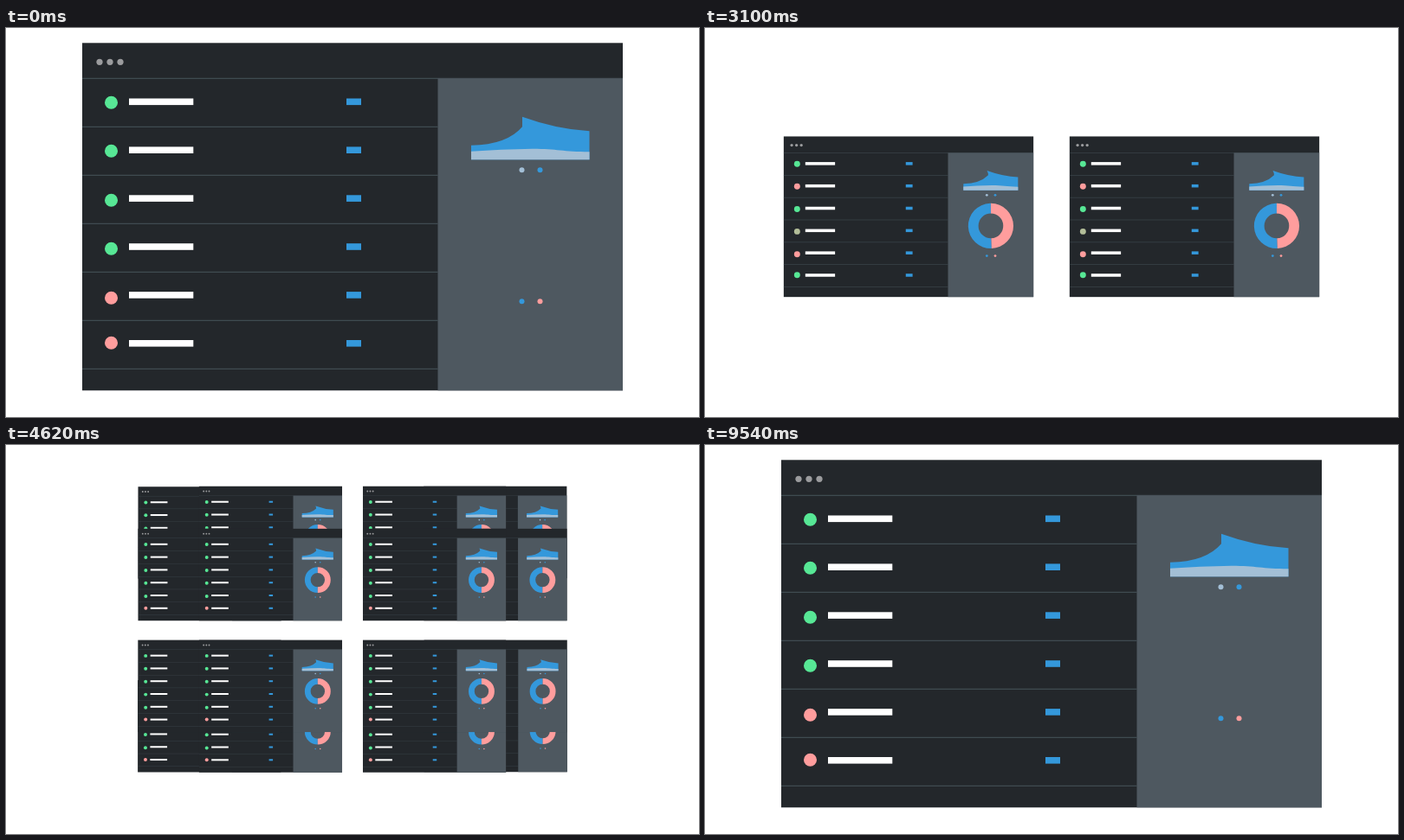
An HTML page with a canvas that plays this animation: 800 px wide and 450 px high, repeating every 9580 ms.

```html
<!DOCTYPE html>
<html lang="en">
<head>
<meta charset="utf-8">
<title>Multiplying dashboards</title>
<style>
  html, body { margin: 0; width: 100%; height: 100%; overflow: hidden; background: #fff; }
  canvas { display: block; }
</style>
</head>
<body>
<canvas id="stage" width="800" height="450"></canvas>
<script>
const ctx = document.getElementById('stage').getContext('2d');
const LOOP = 9580, RESET = 9540, SPLIT = 4160;
const W = 624, H = 402, HEAD = 41, SIDE = 410.5;
const DARK = '#23272b', SLATE = '#4e5860', RULE = '#46545b', GREY = '#9b9c9e';
const BLUE = '#3498db', PALE = '#a3bfd6', PINK = [255, 157, 157], GREEN = [87, 231, 149];
const rgb = c => `rgb(${c.map(Math.round).join()})`;
const mix = (a, b, p) => a + (b - a) * p;
const sine = p => (1 - Math.cos(Math.PI * p)) / 2;

// Piecewise eased value through [time, value] keys
function track(t, keys, ease = sine) {
  if (t <= keys[0][0]) return keys[0][1];
  for (let i = 1; i < keys.length; i++) {
    const [t0, a] = keys[i - 1], [t1, b] = keys[i];
    if (t < t1) return mix(a, b, ease((t - t0) / (t1 - t0)));
  }
  return keys[keys.length - 1][1];
}

// Status lights: start state (1 = pink), then the moments each one flips
const DOT_Y = [69, 125, 182, 238, 295, 347];
const FLIPS = [[0], [0, 1900, 3500], [0, 1130, 2400], [0, 2200, 3020], [1, 3450, 5800], [1, 2500, 4350]];
function lightColor(t, [state, ...times]) {
  let p = state;
  for (const start of times) {
    const f = Math.min(1, Math.max(0, (t - start) / 180));
    p = mix(p, 1 - p, f);
  }
  return rgb(GREEN.map((g, i) => mix(g, PINK[i], p)));
}

function rect(x, y, w, h, color) {
  ctx.fillStyle = color;
  ctx.fillRect(x, y, w, h);
}
function dot(x, y, r, color) {
  ctx.fillStyle = color;
  ctx.beginPath();
  ctx.arc(x, y, r, 0, 7);
  ctx.fill();
}
function ring(from, to, color) {
  if (to <= from) return;
  const a = (from - 90) * Math.PI / 180, b = (to - 90) * Math.PI / 180;
  ctx.fillStyle = color;
  ctx.beginPath();
  ctx.arc(517.5, 224, 56.5, a, b);
  ctx.arc(517.5, 224, 31, b, a, true);
  ctx.fill();
}

function chart(t) {
  const lean = track(t, [[1300, 0], [2600, 3]]);
  ctx.fillStyle = BLUE;
  ctx.fill(new Path2D(`M449 135V118.5Q490 118 ${508 + lean} 97Q${508 + lean} 91 508 85.5Q548 100 585.5 102V135Z`));
  ctx.fillStyle = PALE;
  ctx.fill(new Path2D('M449 135V125.5Q483 123 520 122.5C548 122.5 555 126 585.5 126V135Z'));
}

function dashboard(cx, cy, scale, t) {
  ctx.setTransform(scale, 0, 0, scale, cx - W / 2 * scale, cy - H / 2 * scale);
  rect(0, 0, W, H, DARK);
  for (const x of [20, 32, 44]) dot(x, 22, 3.6, GREY);
  for (let i = 0; i < 7; i++) rect(0, 40.5 + 56 * i, i ? SIDE : W, 1, RULE);
  rect(SIDE, HEAD, W - SIDE, H - HEAD, SLATE);
  FLIPS.forEach((flips, i) => {
    dot(33.5, DOT_Y[i], 7.5, lightColor(t, flips));
    rect(54, 64.2 + 55.9 * i, 74.3, 7.6, '#fff');
    rect(305, 64.2 + 55.9 * i, 17, 7.6, BLUE);
  });
  chart(t);
  dot(507.5, 147, 3, PALE);
  dot(528.5, 147, 3, BLUE);
  dot(507.5, 299, 3, BLUE);
  dot(528.5, 299, 3, rgb(PINK));
  const sweep = track(t, [[1000, 0], [1900, 360]]);
  const share = track(t, [[3100, 178], [3980, 204], [4060, 204], [4620, 180], [4900, 180], [6000, 120]]);
  ring(share, sweep, BLUE);
  ring(0, Math.min(share, sweep), rgb(PINK));
}

// Final centres of the 4 x 4 grid, by row
const GRID_X = [
  [170.5, 323, 477, 629], [170.5, 323, 477, 629.6],
  [170, 323, 477, 630.4], [169.2, 323, 477, 630.4]];
const GRID_Y = [
  [62, 60.3, 60.3, 60.3], [163, 163, 163, 163],
  [267.8, 267.8, 267.8, 267.8], [371.3, 372.2, 372.2, 370.5]];
const ORDER = [3, 0, 2, 1];
const isOuter = i => i === 0 || i === 3;

function draw(t) {
  ctx.setTransform(1, 0, 0, 1, 0, 0);
  rect(0, 0, 800, 450, '#fff');
  const inner = track(t, [[SPLIT, 0], [4880, 1]]);
  const outer = track(t, [[4370, 0], [5060, 1]]);
  const scale = t < 2500
    ? track(t, [[1000, 1], [2040, .462]], p => p)
    : track(t, [[3140, .462], [3900, .387], [SPLIT, .387], [4880, .2155]]);
  const gapX = track(t, [[1000, 0], [1680, 387], [2150, 330], [3140, 330], [3900, 276.5]]);
  const gapY = track(t, [[3140, 0], [3640, 215], [3920, 188.5]]);
  const midY = track(t, [[3140, 218.3], [3700, 212]]);
  for (const r of ORDER) for (const c of ORDER) {
    const edge = isOuter(r) || isOuter(c);
    if (edge && t < SPLIT || t < 3140 && r !== 1 || t < 1000 && c !== 1) continue;
    const x = 400 + gapX * (c < 2 ? -.5 : .5);
    const y = midY + gapY * (r < 2 ? -.5 : .5);
    dashboard(
      mix(x, GRID_X[r][c], isOuter(c) ? outer : inner),
      mix(y, GRID_Y[r][c], isOuter(r) ? outer : inner), scale, t);
  }
}

const start = performance.now();
function tick() {
  const t = (performance.now() - start) % LOOP;
  draw(t < RESET ? t : 0);
  requestAnimationFrame(tick);
}
tick();
</script>
</body>
</html>
```
